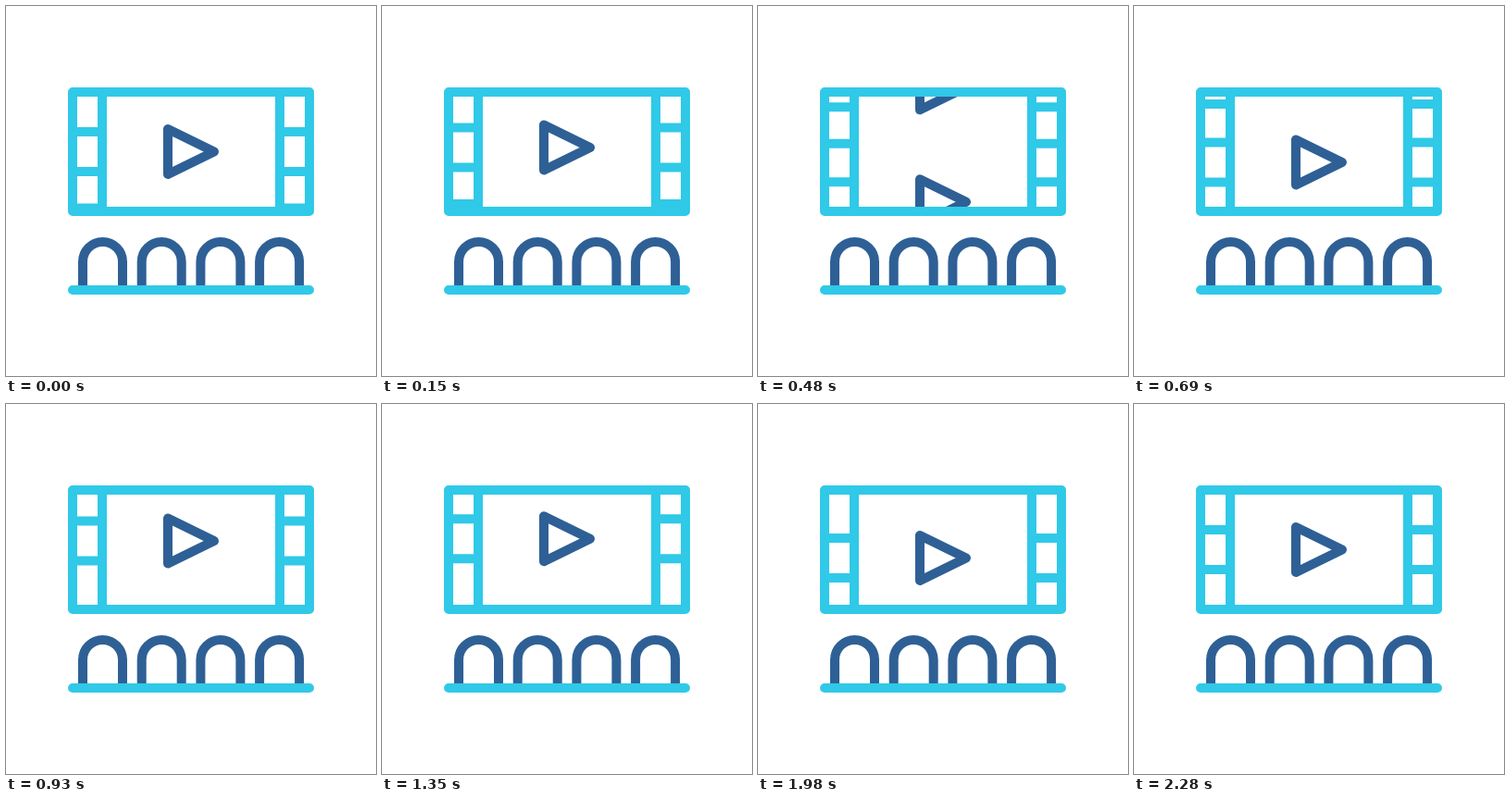
Write an HTML page that moves like this. It is 400 by 400 pixels and loops after 2430 ms.

```html
<!DOCTYPE html>
<html lang="en">
<head>
<meta charset="utf-8">
<title>Cinema</title>
<style>
  html, body { margin: 0; width: 100%; height: 100%; overflow: hidden; background: #fff; }
  svg { display: block; width: 100%; height: 100%; }
  path { fill: none; stroke-width: 10; stroke-linecap: round; stroke-linejoin: round; }
  .light { stroke: #30c9e8; }
  .dark { stroke: #2e6096; }
</style>
</head>
<body>
<svg viewBox="0 0 400 400">
  <defs>
    <clipPath id="screen"><path d="M72 93H328V222H72Z"/></clipPath>
    <g id="reel">
      <path class="light" d="M72 136H104M72 179H104M296 136H328M296 179H328"/>
      <path class="dark" d="M175 133V182L225 157.5Z"/>
    </g>
  </defs>
  <g clip-path="url(#screen)">
    <use id="leaving" href="#reel"/>
    <use id="entering" href="#reel"/>
    <path id="splice" class="light" d="M72 0H104M296 0H328"/>
  </g>
  <path class="light" d="M72 93H328V222H72ZM104 93V222M296 93V222"/>
  <path id="seats" class="dark"/>
  <path class="light" d="M72 307H328"/>
</svg>
<script>
const LOOP = 2430, STEP = 30, TRAVEL = 124;
const OVERSHOOT = 1230, REBOUND = 1750, REST = 2280;
const byId = id => document.getElementById(id);

byId('seats').setAttribute('d', [0, 1, 2, 3].map(i =>
  `M${83 + i * 63.7} 307V276.5a21.5 21.5 0 0 1 43 0V307`).join(''));

// Cubic bezier easing with control points (a, 0) and (b, 1).
function ease(x, a, b) {
  let lo = 0, hi = 1;
  for (let i = 0; i < 24; i++) {
    const u = (lo + hi) / 2, v = 1 - u;
    if (3 * a * u * v * v + 3 * b * u * u * v + u * u * u < x) lo = u; else hi = u;
  }
  return lo * lo * (3 - 2 * lo);
}

// Film position: roll up past the next picture, swing back, settle.
function filmY(t) {
  const move = (t0, t1, y0, y1, a = 1 / 3, b = 2 / 3) =>
    y0 + (y1 - y0) * ease((t - t0) / (t1 - t0), a, b);
  if (t < OVERSHOOT) return move(0, OVERSHOOT, 0, -TRAVEL - 16, 0.44, 0.27);
  if (t < REBOUND) return move(OVERSHOOT, REBOUND, -TRAVEL - 16, -TRAVEL + 15);
  if (t < REST) return move(REBOUND, REST, -TRAVEL + 15, -TRAVEL);
  return -TRAVEL;
}

function draw(now) {
  const t = Math.floor(now % LOOP / STEP) * STEP;
  const y = filmY(t);
  const place = (id, dy) => byId(id).setAttribute('transform', `translate(0 ${dy.toFixed(2)})`);
  place('leaving', y);
  place('entering', y + TRAVEL);
  place('splice', y + (t < OVERSHOOT ? 218.5 : 206));
  requestAnimationFrame(draw);
}
requestAnimationFrame(draw);
</script>
</body>
</html>
```
